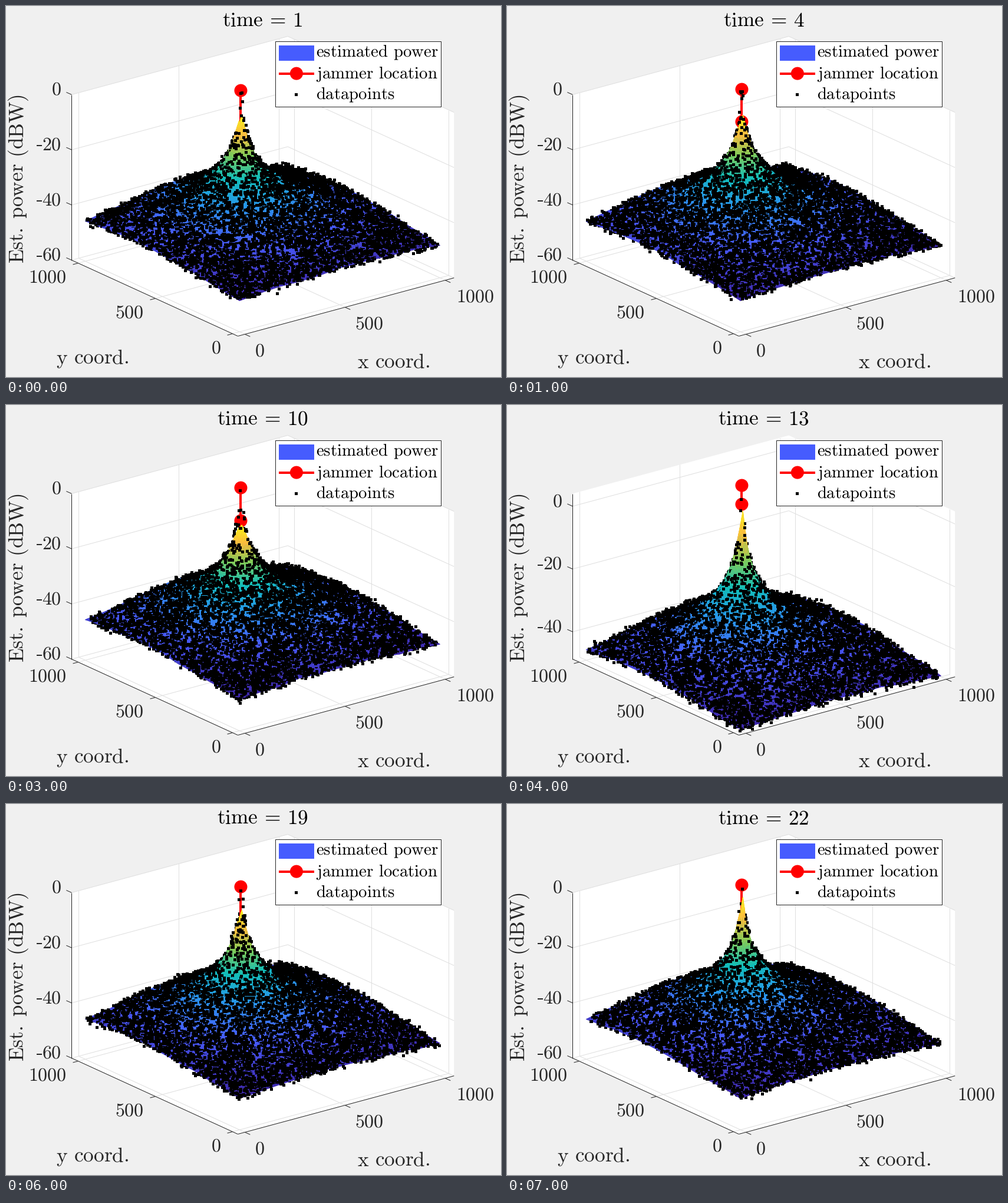
A matplotlib script that plays this animation: 840x630 px, repeating every 8000 ms.

```python
import numpy as np
import matplotlib.pyplot as plt
from matplotlib.animation import FuncAnimation
from matplotlib.collections import PolyCollection
from matplotlib.colors import LinearSegmentedColormap
from matplotlib.patches import Circle, Polygon, Rectangle

plt.rcParams["mathtext.fontset"] = "cm"
plt.rcParams["text.hinting"] = "none"

W, H = 840, 630
PX = 0.72  # points per pixel at 100 dpi
INK, GRID, RED, BLUE = "#262626", "#dfdfdf", "#ff0000", "#465cfe"
XLIM, YLIM = (-35, 1044), (-34, 1042.5)
TICKS = (0, 500, 1000)
BOX_H = 281
JAMMER = (520, 667)
N_DOTS = 10000
DOT_LIFT = 2  # pixels by which a dot stands in front of the surface
NOISE = 0.65

# per step: screen heights of the two jammer markers, smoothing of the peak
TOP = (143, 141, 140, 140, 136, 143, 140, 137)
BOTTOM = (222, 196, 196, 196, 168, 225, 222, 225)
SMOOTH = (120, 120, 45, 325, 0, 60, 90, 0)

PARULA = LinearSegmentedColormap.from_list("parula", [
    (0.2422, 0.1504, 0.6603), (0.2780, 0.3556, 0.9777),
    (0.1540, 0.5902, 0.9218), (0.0704, 0.7457, 0.7258),
    (0.5044, 0.7993, 0.3480), (0.9871, 0.7348, 0.2438),
    (0.9769, 0.9839, 0.0805)])

fig = plt.figure(figsize=(8.4, 6.3), dpi=100, facecolor="#f0f0f0")
ax = fig.add_axes([0, 0, 1, 1])


def ground(x, y):
    """Screen place of a point on the floor."""
    return 396 + 0.34 * x - 0.262 * y, 552.7 - 0.0917 * x - 0.1199 * y


def power(x, y, smooth):
    """Received power in dBW."""
    d2 = (x - JAMMER[0]) ** 2 + (y - JAMMER[1]) ** 2
    sag = 0.5 * (np.sin(np.pi * x / 1000) * np.clip(1 - y / 300, 0, 1)
                 + np.sin(np.pi * y / 1000) * np.clip(1 - x / 300, 0, 1))
    return 15.9 - 11 * np.log10(np.maximum(d2 + smooth, 25)) - sag


def hat(fine, coarse):
    """Linear interpolation matrix."""
    step = coarse[1] - coarse[0]
    return np.maximum(0, 1 - np.abs(fine[:, None] - coarse) / step)


RIPPLE = np.linspace(0, 1000, 11)
COARSE = np.linspace(0, 1000, 51)
FINE = np.linspace(0, 1000, 151)
TO_COARSE, TO_FINE = hat(COARSE, RIPPLE), hat(FINE, COARSE)


def corners(a):
    return np.stack([a[:-1, :-1], a[1:, :-1], a[1:, 1:], a[:-1, 1:]], axis=2)


def tex(s):
    s = s.replace(". ", r".\hspace{0.306}")
    s = s.replace(" = ", r"\hspace{0.179}=\hspace{0.179}")
    return r"$\mathrm{%s}$" % s.replace(" ", r"\hspace{0.38}")


def label(x, y, s, size=32, color=INK, rotation=0):
    ax.text(x, y, tex(s), fontsize=size * PX, color=color, rotation=rotation,
            rotation_mode="anchor", ha="left", va="baseline", zorder=9)


def line(p, q, color=INK, width=1, z=2):
    ax.plot([p[0], q[0]], [p[1], q[1]], color=color, lw=width * PX, zorder=z,
            solid_capstyle="butt")


def disc(x, y, z):
    ax.add_patch(Circle((x, y), 11, fc=RED, ec="none", zorder=z))


def rect(x0, y0, x1, y1, fill, edge="none", z=7):
    ax.add_patch(Rectangle((x0, y0), x1 - x0, y1 - y0, fc=fill, ec=edge,
                           lw=PX, zorder=z))


def draw_box(zmin, scale):
    (xa, xb), (ya, yb) = XLIM, YLIM
    front, left = ground(xa, ya), ground(xa, yb)
    right, back = ground(xb, ya), ground(xb, yb)

    def up(p, h=BOX_H):
        return p[0], p[1] - h

    ax.add_patch(Polygon([up(left), up(back), up(right), right, front, left],
                         fc="white", ec="none", zorder=0))
    for t in TICKS:
        near, far = ground(t, ya), ground(t, yb)
        line(near, far, GRID, z=1)
        line(far, up(far), GRID, z=1)
        line(near, (near[0] + 9, near[1] + 4))
        near, far = ground(xa, t), ground(xb, t)
        line(near, far, GRID, z=1)
        line(far, up(far), GRID, z=1)
        line(near, (near[0] - 9, near[1] + 2.4))
        label(near[0] - 20.5 - 16 * len(str(t)), near[1] + 33, str(t))
    for x, y, s in ((421.5, 594, "0"), (592, 547.5, "500"), (764, 501.5, "1000")):
        label(x, y, s)

    for t in (0, -20, -40, -60):
        h = (t - zmin) * scale
        if h < -1:
            continue
        p = up(left, h)
        line(p, up(back, h), GRID, z=1)
        line(up(back, h), up(right, h), GRID, z=1)
        line(p, (p[0] - 9, p[1] - 4))
        s = str(abs(t))
        x, y = 94 - 16 * len(s), p[1]
        label(x - 1, y, s)
        if t:
            rect(x - 10.3, y - 7.8, x - 1.9, y - 6, INK)

    line(front, right)
    line(front, left)
    line(left, up(left))


def draw_scene(i, zmin, scale):
    rng = np.random.default_rng(40 + i)
    gx, gy = np.meshgrid(COARSE, COARSE, indexing="ij")
    z = power(gx, gy, SMOOTH[i])
    z = z + TO_COARSE @ rng.normal(0, 0.2, (11, 11)) @ TO_COARSE.T
    z = TO_FINE @ z @ TO_FINE.T
    sx, base = ground(*np.meshgrid(FINE, FINE, indexing="ij"))
    sy = base - (z - zmin) * scale
    quads = corners(np.stack([sx, sy], axis=-1)).reshape(-1, 4, 2)
    depth = corners(base).mean(axis=2).ravel()
    level = corners(z).mean(axis=2).ravel()
    colors = PARULA((level - z.min()) / (z.max() - z.min()))

    x, y = rng.uniform(0, 1000, (2, N_DOTS)) + rng.normal(0, 3, (2, N_DOTS))
    dot_z = power(x, y, 0) + rng.normal(0, NOISE, N_DOTS)
    dot_z = np.minimum(dot_z, zmin + BOX_H / scale)
    dx, dot_base = ground(x, y)
    mid = np.stack([dx, dot_base - (dot_z - zmin) * scale], axis=-1)
    square = np.array([(-2, -2), (2, -2), (2, 2), (-2, 2)])
    dots = mid[:, None] + square

    # paint from back to front, with the jammer stem in between
    polys = np.concatenate([quads, dots])
    colors = np.concatenate([colors, np.tile((0, 0, 0, 1), (N_DOTS, 1))])
    depth = np.concatenate([depth, dot_base + DOT_LIFT])
    order = np.argsort(depth, kind="stable")
    jx, jy = ground(*JAMMER)
    cut = np.searchsorted(depth[order], jy)
    for part, zorder in ((order[:cut], 3), (order[cut:], 5)):
        ax.add_collection(PolyCollection(
            polys[part], facecolors=colors[part], edgecolors="face",
            linewidths=PX, zorder=zorder), autolim=False)
    line((jx, TOP[i]), (jx, BOTTOM[i]), RED, 4, 4)
    disc(jx, TOP[i], 4)
    disc(jx, BOTTOM[i], 4)


def draw_legend():
    rect(457, 59, 738, 170, "white", INK, 6)
    rect(462.5, 66.5, 522.5, 92.5, BLUE)
    line((462.5, 114), (522.5, 114), RED, 4, 7)
    disc(492.5, 114, 8)
    rect(489.5, 147.5, 494.5, 152.5, "black")
    for k, s in enumerate(("estimated power", "jammer location", "datapoints")):
        label(526, 86 + 36 * k, s, 28.8, "black")


def update(i):
    ax.clear()
    # the small shift centres whole numbers on pixels when lines snap
    ax.set_xlim(-0.4, W - 0.4)
    ax.set_ylim(H - 0.6, -0.6)
    ax.axis("off")
    zmin, zmax = (-48.7, 4.02) if i == 4 else (-60, 0)
    scale = BOX_H / (zmax - zmin)
    draw_box(zmin, scale)
    draw_scene(i, zmin, scale)
    draw_legend()
    time = 1 + 3 * i
    label(367 if time < 10 else 358, 34, f"time = {time}", 35.2, "black")
    label(595.5, 614, "x coord.", 35.2)
    label(84.5, 607, "y coord.", 35.2)
    label(29.5, 436, "Est. power (dBW)", 35.2, rotation=90)


anim = FuncAnimation(fig, update, frames=8, interval=1000, repeat=True)
plt.show()
```
